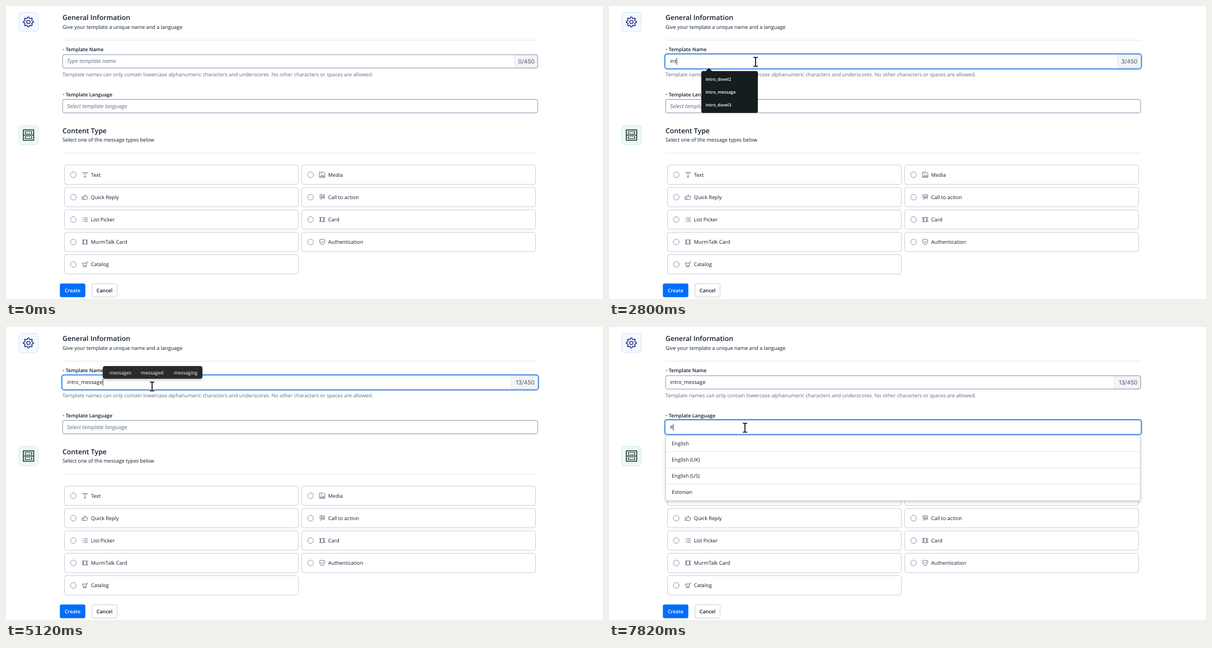
Recreate the animation shown at these times as an HTML page. Size 1067 by 525 pixels, loop 8000 ms.

```html
<!DOCTYPE html>
<html lang="en">
<head>
<meta charset="utf-8">
<title>Template form</title>
<style>
  html, body { margin: 0; width: 100%; height: 100%; overflow: hidden; background: #fff; }
  svg { display: block; width: 100vw; height: 100vh; }
  text { font: 9.15px "Open Sans", "Noto Sans", sans-serif; fill: #121c2d; text-rendering: geometricPrecision; white-space: pre; }
  .title { font-size: 12.3px; font-weight: 600; }
  .label { font-size: 8.9px; font-weight: 600; }
  .muted { fill: #606b85; }
  .hint { font-size: 9.8px; font-style: italic; fill: #606b85; }
  .input { font-size: 9.4px; }
  .count { font: 10.3px Inter, "Open Sans", sans-serif; fill: #4b5671; text-anchor: end; }
  .saved { font-size: 7.7px; font-weight: 600; fill: #fff; }
  .word { font-size: 8.5px; fill: #fff; }
  .icon { fill: none; stroke: #606b85; stroke-width: .95; stroke-linejoin: round; stroke-linecap: round; }
</style>
</head>
<body>
<svg id="stage" viewBox="0 0 1067 525" preserveAspectRatio="none">
  <defs>
    <filter id="shadow" x="-10%" y="-20%" width="120%" height="150%">
      <feDropShadow dx="0" dy="2" stdDeviation="2.5" flood-color="#121c2d" flood-opacity=".25"/>
    </filter>
    <clipPath id="listClip"><rect id="listWindow" x="101" y="193" width="849" height="118"/></clipPath>
  </defs>
  <g id="page"></g>
  <g id="fields"></g>
  <g id="list"></g>
  <g id="saved"></g>
  <g id="bar"></g>
  <g id="pointer">
    <path id="arrow" d="M0 0V14L3.2 11L5.6 16.6L7.9 15.6L5.5 10.2H10Z" fill="#fff" stroke="#111" stroke-width=".9" stroke-linejoin="round"/>
    <g id="beam" fill="none">
      <path d="M-4 -8H-1L0 -7L1 -8H4M-4 8H-1L0 7L1 8H4M0 -7V7" stroke="#fff" stroke-width="3"/>
      <path d="M-4 -8H-1L0 -7L1 -8H4M-4 8H-1L0 7L1 8H4M0 -7V7" stroke="#000" stroke-width="1.6"/>
    </g>
  </g>
</svg>
<script>
const LOOP = 8000;
const BLINK = 530;
const BLUE = '#0263e0';
const $ = id => document.getElementById(id);

const text = (x, y, s, cls = '') => `<text x="${x}" y="${y}" class="${cls}">${s}</text>`;
const rect = (x, y, w, h, r, attrs) => `<rect x="${x}" y="${y}" width="${w}" height="${h}" rx="${r}" ${attrs}/>`;
const line = (x1, y1, x2, y2, color) => `<path d="M${x1} ${y1}L${x2} ${y2}" stroke="${color}"/>`;
const show = (node, on) => node.setAttribute('display', on ? 'inline' : 'none');

// Icons are drawn around their own centre.
const cardIcon = 'M-2.3 -4H2.3V4H-2.3ZM-5 -4C-3.2 -2 -3.2 2 -5 4M5 -4C3.2 -2 3.2 2 5 4M-4.2 -3.6L-2.3 -2M-4.2 3.6L-2.3 2M4.2 -3.6L2.3 -2M4.2 3.6L2.3 2';
const icons = {
  text: 'M-4 -2.3V-4H4V-2.3M0 -4V4M-1.7 4H1.7',
  media: 'M-4.7 -4.7H2.5L4.7 -2.5V4.7H-4.7ZM-3 3L-.8 0L.8 1.8L2 .6L3.3 3ZM-2.5 -2.2H-1.5',
  thumb: 'M-4.8 -.7H-2.4V4H-4.8ZM-2.4 -.5L0 -4.2Q1.6 -4.4 1.2 -2.4L.8 -1H4.2Q5 -.8 4.7 .2L3.7 3.7Q3.4 4.2 2.6 4.2H-1L-2.4 3.4',
  action: 'M-2 1.3H-4V-4.5H4V1.3H3M-1.6 -2.2L3 -.7L1 .4L3.7 3.3M-1.6 -2.2L-.4 2.6L.5 1M-1 2L-3.2 4.5',
  list: 'M-4.2 -3H-3.8M-4.2 0H-3.8M-4.2 3H-3.8M-1.7 -3H4.4M-1.7 0H4.4M-1.7 3H4.4',
  card: cardIcon,
  shield: 'M0 -5L4.4 -3.8V0Q4 3.5 0 5Q-4 3.5 -4.4 0V-3.8ZM-2 -.2L-.5 1.4L2.2 -1.5',
  cart: 'M5 -4.7H3.8L2.2 2H-3.4L-4.8 -2.4H3M-3 3.9H2.2M-2.4 4.5H-2.2M1.4 4.5H1.6'
};
const options = [
  ['Text', 'text'], ['Media', 'media'], ['Quick Reply', 'thumb'], ['Call to action', 'action'],
  ['List Picker', 'list'], ['Card', 'card'], ['MurmTalk Card', 'card'], ['Authentication', 'shield'], ['Catalog', 'cart']
];

function option([label, icon], i) {
  const x = 104.5 + (i % 2) * 424, y = 285 + Math.floor(i / 2) * 40.15;
  return rect(x, y, 418, 34.6, 4, 'fill="#fff" stroke="#cacdd8"') +
    `<circle cx="${x + 15.8}" cy="${y + 17.4}" r="5.1" fill="#fff" stroke="#8891aa"/>` +
    `<path class="icon" transform="translate(${x + 36.7} ${y + 17.4})" d="${icons[icon]}"/>` +
    text(x + 47.3, y + 20.8, label);
}

function gear(cx, cy) {
  const points = [];
  for (let i = 0; i < 32; i++) {
    const a = (i - 1.5) * Math.PI / 16, r = i % 4 === 1 || i % 4 === 2 ? 9 : 6.7;
    points.push((cx + r * Math.sin(a)).toFixed(1) + ',' + (cy - r * Math.cos(a)).toFixed(1));
  }
  return `<g fill="none" stroke="#15237a" stroke-width="1.4" stroke-linejoin="round">
    <polygon points="${points.join(' ')}"/><circle cx="${cx}" cy="${cy}" r="3"/></g>`;
}

const required = y => `<circle cx="102.7" cy="${y}" r="1.2" fill="#de7434"/>`;

$('page').innerHTML =
  rect(23, 11.5, 34.5, 34.5, 5, 'fill="#f4f9ff" stroke="#d3e5fb"') + gear(40, 28.6) +
  rect(23, 214, 34.5, 34.5, 5, 'fill="#edfaf4" stroke="#cdeedd"') +
  `<g fill="none" stroke="#10291f" stroke-width="1.5">
    <path d="M31 222H49.5V240.5H31ZM31 231.2H49.5"/>
    <path d="M34.5 228.5V225H46V228.5M34.5 234V237.5H46V234" stroke-width="1.2"/>
    <path d="M34.5 228.7H46M34.5 233.8H46" stroke-dasharray="2 1.2" stroke-width="1.2"/></g>` +
  text(101, 25, 'General Information', 'title') +
  text(101, 40.8, 'Give your template a unique name and a language') +
  line(101, 61.2, 950, 61.2, '#e1e3ea') +
  required(78) + text(106.7, 81.3, 'Template Name', 'label') +
  text(101, 125.6, 'Template names can only contain lowercase alphanumeric characters and underscores. No other characters or spaces are allowed.', 'muted') +
  required(158.4) + text(106.7, 161.7, 'Template Language', 'label') +
  text(101, 227.8, 'Content Type', 'title') +
  text(101, 243.4, 'Select one of the message types below') +
  line(101, 263.8, 950, 263.8, '#e1e3ea') +
  options.map(option).join('') +
  rect(96.3, 497.2, 45.5, 24.6, 3, 'fill="#006dfa"') +
  `<text x="119" y="512.8" class="label" text-anchor="middle" style="fill:#fff">Create</text>` +
  rect(153.5, 497.5, 45, 24, 3, 'fill="#fff" stroke="#cacdd8"') +
  `<text x="176" y="512.8" class="label" text-anchor="middle">Cancel</text>`;

function makeField(id, y, hint) {
  $('fields').insertAdjacentHTML('beforeend', `<g>
    ${rect(99.7, y - 1.5, 852, 27, 4.5, `id="${id}Ring" fill="#fff" stroke="#3f89e9" stroke-width="2"`)}
    <path id="${id}Side" fill="#f4f4f6"/>
    ${rect(101.2, y, 849, 24, 3, `id="${id}Box" fill="none"`)}
    ${text(109, y + 15.2, hint, 'hint').replace('<text', `<text id="${id}Hint"`)}
    <text id="${id}Value" class="input" x="109" y="${y + 15}"></text>
    <path id="${id}Caret" stroke="#121c2d" stroke-width=".9"/>
    <text id="${id}Count" class="count" x="944.8" y="${y + 15.5}"></text></g>`);
  return { id, y };
}
const nameField = makeField('name', 87.2, 'Type template name');
const langField = makeField('lang', 167.4, 'Select template language');

function drawField({ id, y }, { value, focused, hover, caret, limit }) {
  const valueNode = $(id + 'Value');
  valueNode.textContent = value;
  show($(id + 'Hint'), !value);
  show($(id + 'Ring'), focused);
  $(id + 'Box').setAttribute('stroke', focused ? '#b7d2f5' : hover ? BLUE : '#8891aa');
  $(id + 'Box').setAttribute('stroke-width', focused ? .6 : 1);
  show($(id + 'Caret'), focused && caret);
  const x = 109.6 + (value ? valueNode.getComputedTextLength() : 0);
  $(id + 'Caret').setAttribute('d', `M${x} ${y + 6}V${y + 18}`);
  if (!limit) return;
  const side = value.length > 9 ? 903 : 909;
  $(id + 'Count').textContent = value.length + '/' + limit;
  $(id + 'Side').setAttribute('d', `M${side} ${y + .5}H950V${y + 23.5}H${side}Z`);
  $(id + 'Side').setAttribute('stroke', '#e1e3ea');
}

const NAME = 'intro_message';
const keyTimes = [2600, 2700, 2800, 3000, 3070, 3530, 3980, 4200, 4350, 4480, 4650, 4850, 4980];
const suggestions = [
  [3070, 3260, 124, 225, 'introduction', 60, 'introducing', 68, 'introductory'],
  [3260, 3530, 130, 219, 'introduction', 66, 'introducing', 66, 'introductory'],
  [4650, 4850, 162.6, 146.5, 'message', 52, 'miss', 36, 'messages'],
  [4850, 5040, 168, 174, 'message', 52, 'messages', 56, 'messaging'],
  [5040, 5960, 173, 178, 'messages', 56, 'messaged', 59, 'messaging']
];
const savedStates = [
  [940, 3980, 75, ['intro_dovel2', 'intro_message', 'intro_dovel3']],
  [3980, 4050, 33, ['intro_dovel2']],
  [4050, 5120, 29, ['intro_message']]
];
const languages = ['Afrikaans', 'Albanian', 'Arabic', 'Azerbaijani', 'Bengali', 'Bulgarian', 'Catalan', 'Chinese (CHN)', 'Chinese (HKG)', 'Chinese (TAI)'];
const matches = ['English', 'English (UK)', 'English (US)', 'Estonian'];
const lists = [
  [6030, 6100, 270, languages],
  [6100, 7820, 191, languages],
  [7820, LOOP, 117, matches]
];
const active = (states, t) => states.find(([from, to]) => t >= from && t < to);

function drawBar(t) {
  const state = active(suggestions, t);
  if (!state) return '';
  const [, , x, w, first, gap1, second, gap2, third] = state;
  return rect(x, 70, w, 22.7, 4, 'fill="#2b2b2b" filter="url(#shadow)"') +
    text(x + 12, 84.8, first, 'word') + text(x + 12 + gap1, 84.8, second, 'word') +
    text(x + 12 + gap1 + gap2, 84.8, third, 'word');
}

function drawSaved(t) {
  const state = active(savedStates, t);
  if (!state) return '';
  const [, , h, rows] = state;
  return '<path d="M172 117.5L178.5 111L185 117.5Z" fill="#161d1e"/>' +
    rect(165, 116.5, 101, h, 3, 'fill="#161d1e"') +
    rows.map((row, i) => text(172.7, 133.6 + i * 23.4, row, 'saved')).join('');
}

function drawList(t) {
  const state = active(lists, t);
  if (!state) return '';
  const [, , h, rows] = state;
  $('listWindow').setAttribute('height', h);
  return rect(101.5, 194, 848, h, 2, 'fill="#fff" stroke="#cacdd8" stroke-width=".8" filter="url(#shadow)"') +
    '<g clip-path="url(#listClip)">' + rows.map((row, i) =>
      (i ? line(102, 194 + i * 29.2, 949, 194 + i * 29.2, '#e1e3ea') : '') +
      text(112.3, 211.7 + i * 29.2, row)).join('') + '</g>';
}

const ease = p => (1 - Math.cos(Math.PI * p)) / 2;

// Moves between two points in visible steps, as a sampled mouse does.
function glide(t, start, end, steps, [x1, y1], [x2, y2]) {
  const p = ease(Math.min(1, Math.floor((t - start) / (end - start) * steps + 1e-6) / steps));
  return [x1 + (x2 - x1) * p, y1 + (y2 - y1) * p];
}

function pointerAt(t) {
  const outside = [1026, 508], onName = [262, 100], below = [249, 198], onLang = [243, 179.6];
  if (t < 5040) return glide(Math.max(t, 70), 70, 810, 10, outside, onName);
  if (t < 5510) return glide(t, 5040, 5510, 6, onName, below);
  if (t < 7290) return glide(t, 5510, 5830, 4, below, onLang);
  return [243, 180.5];
}

const inside = ([x, y], field) => x > 101 && x < 950 && y > field.y && y < field.y + 24;

function render(t) {
  const spot = pointerAt(t);
  const typed = keyTimes.filter(k => k <= t).length;
  const onLanguage = t >= 5960;
  const lastEvent = t >= 7820 ? 7820 : onLanguage ? 5960 : typed ? keyTimes[typed - 1] : 820;
  const caret = Math.floor((t - lastEvent) / BLINK) % 2 === 0;

  drawField(nameField, {
    value: NAME.slice(0, typed), focused: t >= 880 && !onLanguage,
    hover: t >= 70 && inside(spot, nameField), caret, limit: 450
  });
  drawField(langField, {
    value: t >= 7820 ? 'e' : '', focused: onLanguage,
    hover: t >= 70 && inside(spot, langField), caret
  });
  $('langRing').setAttribute('opacity', t < 6290 ? .85 : 1);
  $('list').innerHTML = drawList(t);
  $('saved').innerHTML = drawSaved(t);
  $('bar').innerHTML = drawBar(t);

  const overBar = (t >= 3260 && t < 3980) || (t >= 4650 && t < 5120);
  const beam = !overBar && (inside(spot, nameField) || inside(spot, langField));
  show($('pointer'), t >= 70);
  show($('beam'), beam);
  show($('arrow'), !beam);
  $('pointer').setAttribute('transform', `translate(${spot[0] - (beam ? 0 : 1)} ${spot[1] - (beam ? 0 : 1)})`);
}

const began = performance.now();
function tick() {
  render((performance.now() - began) % LOOP);
  requestAnimationFrame(tick);
}
tick();
</script>
</body>
</html>
```
